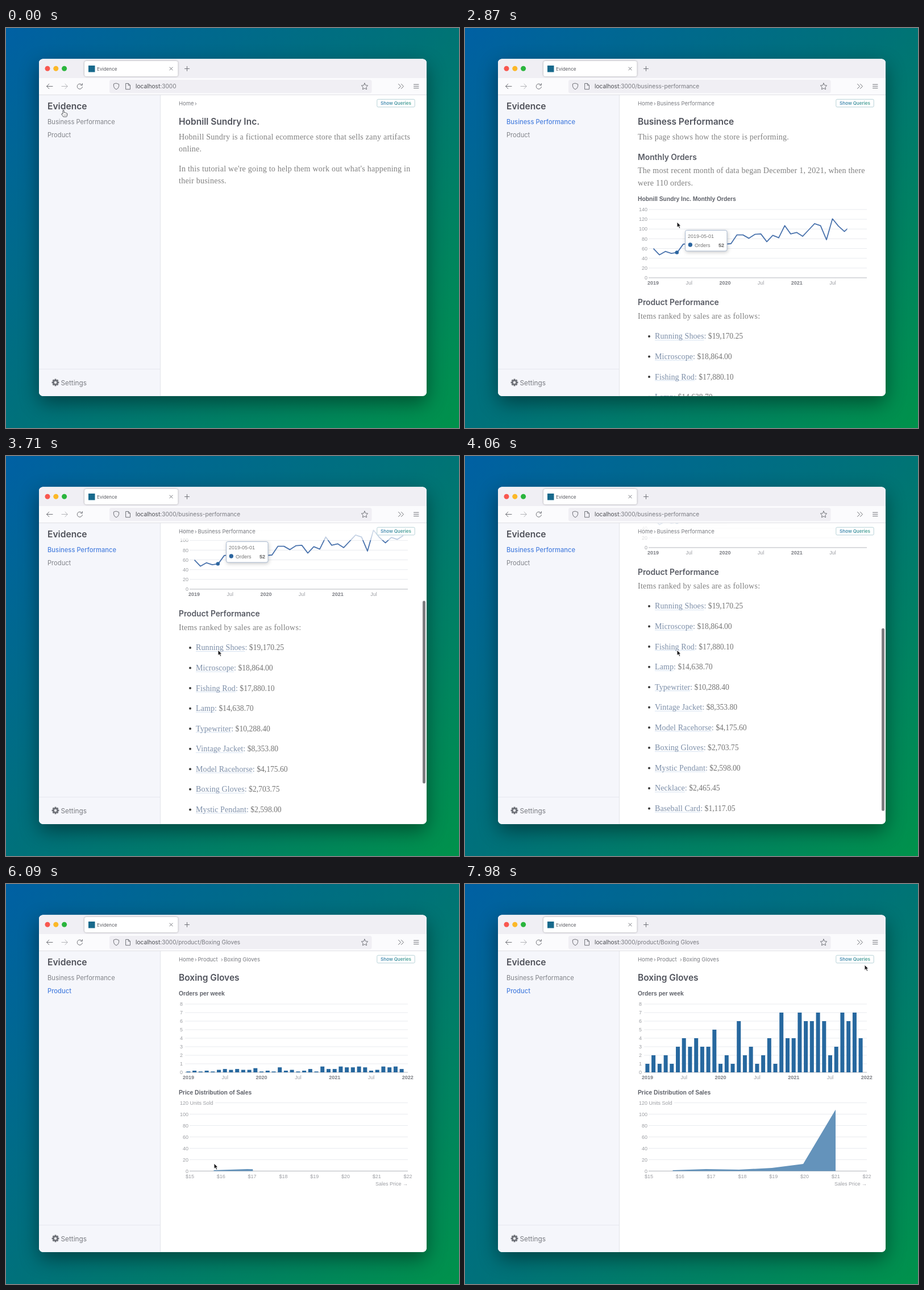
Recreate the animation shown at these times as an HTML page. Size 797 by 703 pixels, loop 8 s.

```html
<!DOCTYPE html>
<html lang="en">
<head>
<meta charset="utf-8">
<title>Evidence</title>
<style>
  html, body { margin: 0; width: 100%; height: 100%; overflow: hidden; }
  svg { display: block; width: 100%; height: 100%; }
  text { white-space: pre; }
  .ui { font-family: Inter, sans-serif; }
  .bold { font-family: Inter, sans-serif; font-weight: 600; }
  .serif { font-family: "Liberation Serif", serif; letter-spacing: .25px; }
  .link { letter-spacing: .1px; }
  .price { font-size: 13.6px; letter-spacing: 0; }
  .chart { font-family: "Liberation Sans", Arial, sans-serif; }
  .chartB { font-family: "Liberation Sans", Arial, sans-serif; font-weight: 700; }
  .nav { fill: #818389; }
  .nav.active { fill: #4a80df; font-weight: 500; letter-spacing: .05px; }
  .icon { fill: none; stroke: #707278; stroke-width: 1; stroke-linecap: round; stroke-linejoin: round; }
  .window { filter: drop-shadow(0 12px 17px rgba(0, 0, 0, .42)); }
</style>
</head>
<body>
<svg id="stage" viewBox="0 0 797 703" xmlns="http://www.w3.org/2000/svg"></svg>
<script>
const LOOP = 8000, STEP = 70;
const BIZ_AT = 1960, PRODUCT_AT = 5800, DRAW = 1000;
const STORE = "Hobnill Sundry";
const HOST = "localhost:3000";

const orders = [60, 47, 54, 50, 52, 69, 70, 64, 73, 66, 76, 72, 69, 70, 88, 88, 81, 89,
  90, 74, 87, 82, 107, 90, 93, 85, 98, 111, 107, 78, 121, 106, 95, 106, 102, 110];
const weekly = [..."121213434335121623124174476676237674"].map(Number);
const sales = [[365.5, 1.5], [424, 3.5], [482, 2.5], [540, 5.5], [595, 12.5], [652, 108]];
const items = [
  ["Running Shoes", "19,170.25"], ["Microscope", "18,864.00"], ["Fishing Rod", "17,880.10"],
  ["Lamp", "14,638.70"], ["Typewriter", "10,288.40"], ["Vintage Jacket", "8,353.80"],
  ["Model Racehorse", "4,175.60"], ["Boxing Gloves", "2,703.75"], ["Mystic Pendant", "2,598.00"],
  ["Necklace", "2,465.45"], ["Baseball Card", "1,117.05"], ["Toy Doll", "691.25"]];

// y is the visual middle of the line
const text = (x, y, size, cls, fill, str, extra = "") =>
  `<text x="${x}" y="${y + size * .35}" font-size="${size}" class="${cls}" fill="${fill}" ${extra}>${str}</text>`;
const rect = (x, y, w, h, fill, extra = "") =>
  `<rect x="${x}" y="${y}" width="${w}" height="${h}" fill="${fill}" ${extra}/>`;
const hline = (x1, x2, y, color) =>
  `<path d="M${x1} ${y}H${x2}" stroke="${color}" fill="none"/>`;
const icon = (d, extra = "") => `<path class="icon" d="${d}" ${extra}/>`;
const group = (id, body, extra = "") => `<g id="${id}" ${extra}>${body}</g>`;
const range = n => [...Array(n).keys()];

const title = str => text(304, 164.5, 15.5, "bold", "#50535c", str);
const heading = (y, str) => text(304, y, 13.8, "bold", "#585b64", str);
const para = (y, str) => text(304, y, 14, "serif", "#808080", str);
const chartTitle = (y, str) => text(304, y, 10.3, "chartB", "#5f626a", str);
const label = (x, y, str, anchor = "middle", bold = false) =>
  text(x, y, 9, bold ? "chartB" : "chart", bold ? "#7c7e84" : "#9c9ea3", str, `text-anchor="${anchor}"`);

function grid(left, base, step, max, unit, labelX) {
  let out = "";
  for (let v = 0; v <= max; v += step) {
    const y = base - v * unit;
    out += hline(left, 707, y, v ? "#e9ebef" : "#b4b7bd") + label(labelX, y, v, "end");
  }
  return out;
}

const yearLabels = (x0, gap, y, n) => range(n).map(i =>
  label(x0 + i * gap, y, i % 2 ? "Jul" : 2019 + i / 2, "middle", i % 2 === 0)).join("");

const crumbs = (...parts) => parts.map(([x, s]) => text(x, 133, 9.5, "ui", "#797b81", s)).join("");

function homePage() {
  return title(STORE + " Inc.") +
    para(191.5, STORE + " is a fictional ecommerce store that sells zany artifacts") +
    para(212.5, "online.") +
    para(247.5, "In this tutorial we're going to help them work out what's happening in") +
    para(268.5, "their business.");
}

function bizPage() {
  const base = 439, unit = 120 / 140;
  const pts = orders.map((v, i) => `${(331.5 + i * 10.5).toFixed(1)},${(base - v * unit).toFixed(1)}`);
  const list = items.map(([name, price], i) => {
    const y = 541.5 + i * 35.55;
    return `<circle cx="324" cy="${y + .5}" r="2" fill="#3c3c3c"/>` +
      `<path class="under" d="" stroke="#d6e2f1"/>` +
      text(334, y, 14, "serif", "#757575",
        `<tspan class="link" fill="#7d8fa9">${name}:</tspan><tspan class="price"> $${price}</tspan>`);
  }).join("");
  const tip = rect(387.5, 355.5, 73.5, 36.5, "#fff", 'rx="3" stroke="#a9b9cf" style="filter:drop-shadow(1px 2px 3px rgba(0,0,0,.2))"') +
    text(392, 365.5, 9, "chart", "#777", "2019-05-01") +
    '<circle cx="396.3" cy="381" r="3.7" fill="#2c659f"/>' +
    text(404, 381.5, 9, "chart", "#777", "Orders") +
    text(456, 381.5, 9, "chartB", "#666", "52", 'text-anchor="end"');
  return title("Business Performance") +
    para(191.5, "This page shows how the store is performing.") +
    heading(227, "Monthly Orders") +
    para(250.5, "The most recent month of data began December 1, 2021, when there") +
    para(272, "were 110 orders.") +
    chartTitle(300, STORE + " Inc. Monthly Orders") +
    grid(323, base, 20, 140, unit, 321) + yearLabels(331, 63.2, 447.5, 6) +
    `<polyline points="${pts.join(" ")}" fill="none" stroke="#4a73ad" stroke-width="1.8" stroke-linejoin="round" clip-path="url(#lineClip)"/>` +
    group("tip", `<circle cx="372.8" cy="394.4" r="3.2" fill="#2c659f"/>` + tip) +
    heading(482, "Product Performance") +
    para(506.5, "Items ranked by sales are as follows:") + list;
}

function productPage() {
  const area = sales.map(([x, v]) => `L${x} ${504.5 - v}`).join("");
  return title("Boxing Gloves") +
    chartTitle(192, "Orders per week") + grid(315, 331, 1, 8, 15, 311) +
    yearLabels(321, 64.3, 339.5, 7) +
    weekly.map((v, i) => rect((317.4 + i * 10.72).toFixed(1), 331, 7, 0, "#27689f", 'class="bar"')).join("") +
    chartTitle(366, "Price Distribution of Sales") + grid(323, 504.5, 20, 120, 1, 321) +
    rect(322, 380, 46, 9, "#fff") + label(323.5, 384.5, "Units Sold", "start") +
    range(8).map(i => label(323.5 + i * 54.8, 513.5, "$" + (15 + i))).join("") +
    label(707, 526.5, "Sales Price →", "end") +
    `<path d="M365.5 504.5${area}V504.5Z" fill="#6493bb" clip-path="url(#areaClip)"/>`;
}

function chrome() {
  const dots = ["#f9574f", "#fcb827", "#2ab53c"].map((c, i) =>
    `<circle cx="${73 + i * 14.8}" cy="71.3" r="4.5" fill="${c}"/>`).join("");
  return rect(58, 54, 682, 34, "#f0eff4") + rect(58, 88, 682, 30, "#fbfbfd") +
    hline(58, 740, 117.5, "#dfdfe4") + dots +
    rect(138, 58, 164.5, 27, "#fff", 'rx="3.5" style="filter:drop-shadow(0 0 1.5px rgba(0,0,0,.35))"') +
    rect(145, 66, 11.5, 11.5, "#17698c") + text(160, 72, 8.2, "ui", "#5a5b61", "Evidence") +
    icon("M288 69l5 5M293 69l-5 5") + icon("M314.5 71.5h8M318.5 67.5v8") +
    icon("M82 102.5H71.5M75.8 98.3l-4.3 4.2l4.3 4.2") +
    icon("M98 102.5H108M104 98.3l4.3 4.2l-4.3 4.2", 'style="stroke:#b3b4b9"') +
    icon("M133.6 100A4.6 4.6 0 1 0 134.4 103.5M134.4 97.5V100.5H131.4") +
    rect(182, 91, 461.5, 23.5, "#f0eff4", 'rx="3.5"') +
    icon("M194 97.2l4.6 1.5v3.5q-.4 4-4.6 5.8q-4.2-1.8-4.6-5.8v-3.5z") +
    icon("M211 97.5h4.5l3 3v7.2h-7.5zM215.3 97.7v3h3") +
    icon("M631 97l1.7 3.6 4 .5-2.9 2.8.7 4-3.5-1.9-3.5 1.9.7-4-2.9-2.8 4-.5z") +
    group("reader", icon("M606.5 97.8h8v9.6h-8zM608.5 100.5h4M608.5 102.6h4M608.5 104.7h2.5")) +
    icon("M690.5 98.5l4 4-4 4M695.5 98.5l4 4-4 4") +
    icon("M717.5 99.2h8.5M717.5 102.4h8.5M717.5 105.6h8.5") +
    `<text class="ui" x="228" y="106.4" font-size="10.15" fill="#797a80"><tspan fill="#4c4d53">localhost</tspan>:3000<tspan id="path"></tspan></text>`;
}

function sidebar() {
  const teeth = range(8).map(i => rect(85.6, 616.6, 2.8, 3, "#6f7279", `transform="rotate(${i * 45} 87 623)"`)).join("");
  return rect(58, 118, 213.5, 529, "#f5f6fb") +
    '<path d="M271.5 118V647" stroke="#e2e4ea"/>' + hline(58, 271, 599.5, "#e6e8ef") +
    text(73, 138, 15.6, "bold", "#4e5058", "Evidence") +
    text(73, 165.3, 11.15, "ui nav", "", "Business Performance", 'id="bizLink"') +
    text(73, 188, 11.15, "ui nav", "", "Product", 'id="prodLink"') +
    teeth + '<circle cx="87" cy="623" r="3.6" fill="none" stroke="#6f7279" stroke-width="2.8"/>' +
    text(96.5, 624, 11.8, "ui", "#797b81", "Settings");
}

const stage = document.getElementById("stage");
stage.innerHTML = `<defs>
  <linearGradient id="bg" gradientUnits="userSpaceOnUse" x1="20" y1="-20" x2="777" y2="723">
    <stop offset="0" stop-color="#0060a3"/><stop offset=".5" stop-color="#007278"/><stop offset="1" stop-color="#00924b"/>
  </linearGradient>
  <linearGradient id="fade" x2="0" y2="1">
    <stop offset="0" stop-color="#fff" stop-opacity=".85"/><stop offset=".65" stop-color="#fff" stop-opacity=".72"/>
    <stop offset="1" stop-color="#fff" stop-opacity=".6"/>
  </linearGradient>
  <linearGradient id="teal"><stop offset="0" stop-color="#4589b5"/><stop offset="1" stop-color="#4ba593"/></linearGradient>
  <clipPath id="frame"><rect x="58" y="54.5" width="682" height="592.3" rx="7"/></clipPath>
  <clipPath id="view"><rect x="272" y="118" width="468" height="529"/></clipPath>
  <clipPath id="lineClip"><rect id="lineRect" x="323" y="300" width="0" height="145"/></clipPath>
  <clipPath id="areaClip"><rect id="areaRect" x="323" y="380" width="0" height="130"/></clipPath>
</defs>` +
  rect(0, 0, 797, 703, "url(#bg)") +
  rect(58, 54.5, 682, 592.3, "#fff", 'rx="7" class="window"') +
  `<g clip-path="url(#frame)">` + rect(58, 54, 682, 593, "#fff") +
  `<g clip-path="url(#view)">` +
  group("home", homePage()) + group("biz", bizPage()) + group("product", productPage()) +
  rect(272, 118, 468, 30, "url(#fade)") +
  group("homeCrumb", crumbs([304, "Home"], [332, "›"])) +
  group("bizCrumb", crumbs([304, "Home"], [332, "›"], [337.5, "Business Performance"])) +
  group("productCrumb", crumbs([304, "Home"], [332, "›"], [337.5, "Product"], [378, "›"], [383, "Boxing Gloves"])) +
  rect(652.8, 125.3, 66.4, 13.6, "#fff", 'rx="2" stroke="#b7d2d8"') +
  text(686, 132.5, 8, "bold", "url(#teal)", "Show Queries", 'text-anchor="middle"') +
  rect(733, 119, 5, 321, "#7d7d80", 'rx="2.5" id="thumb"') + `</g>` +
  sidebar() + chrome() +
  group("status", rect(57, 633, 156, 16, "#f9f9fb", 'id="statusBox" rx="2" stroke="#cfcfd5"') +
    text(62, 640, 8.2, "ui", "#56575d", "", 'id="statusText"')) + `</g>` +
  group("arrow", `<path d="M0 0V9.6L2.3 7.5L4 11.2L5.8 10.4L4.2 6.9H7Z" fill="#1c1c1e" stroke="#fff" stroke-width=".9"/>`) +
  group("hand", `<path d="M-1 .9Q0-.6 1 .9V4.6Q2.4 3.8 3 5Q4.6 4.4 5 5.7Q6.6 5.4 6.8 7V9Q6.6 10.6 5.6 12H-.2Q-1.6 9.8-3.4 7.7Q-3.4 6-1.6 6.8L-1 7.3Z" fill="#fff" stroke="#55565c" stroke-width="1"/><path d="M1.2 8v2M3 8v2M4.8 8v2" stroke="#77787d" stroke-width=".7"/>`);

const $ = id => document.getElementById(id);
const bars = stage.querySelectorAll(".bar");
const unders = stage.querySelectorAll(".under");
stage.querySelectorAll(".link").forEach((link, i) => {
  const y = 548.5 + i * 35.55;
  unders[i].setAttribute("d", `M334 ${y}h${link.getComputedTextLength() - 4}`);
});

const clamp = v => Math.max(0, Math.min(1, v));
const cubicInOut = p => p < .5 ? 4 * p ** 3 : 1 - (2 - 2 * p) ** 3 / 2;
const smooth = p => p * p * (3 - 2 * p);
const linear = p => p;
const show = (id, on) => $(id).style.display = on ? "" : "none";
const set = (el, name, v) => el.setAttribute(name, v);

// keys: [time, ...values]
function track(keys, t, ease) {
  const n = keys.findIndex(k => k[0] > t);
  if (n === 0) return keys[0].slice(1);
  if (n < 0) return keys[keys.length - 1].slice(1);
  const a = keys[n - 1], b = keys[n], p = ease((t - a[0]) / (b[0] - a[0]));
  return a.slice(1).map((v, i) => v + (b[i + 1] - v) * p);
}

const pointerKeys = [[210, 101, 144], [1050, 122, 160], [1960, 122, 160], [2660, 373, 341],
  [4340, 373, 341], [4690, 374, 413], [5110, 366, 491], [6930, 366, 491], [7840, 703, 142]];
const scrollKeys = [[3080, 0], [3430, 86], [3710, 205], [4060, 278], [4340, 310]];

function draw(time) {
  const t = Math.floor(time / STEP) * STEP;
  const page = t < BIZ_AT ? "home" : t < PRODUCT_AT ? "biz" : "product";
  for (const p of ["home", "biz", "product"]) {
    show(p, p === page);
    show(p + "Crumb", p === page);
  }
  const path = { home: "", biz: "/business-performance", product: "/product/Boxing Gloves" };
  $("path").textContent = path[page];
  $("bizLink").classList.toggle("active", page === "biz" || (t >= 1680 && page === "home"));
  $("prodLink").classList.toggle("active", page === "product");

  const [scroll] = track(scrollKeys, t, linear);
  set($("biz"), "transform", `translate(0 ${-scroll})`);
  set($("thumb"), "y", 119 + scroll * .661);
  show("thumb", page === "biz" && t > 3080);
  show("tip", t >= 2660 && t < 4340);
  show("reader", t >= 4130 && t < PRODUCT_AT);

  set($("lineRect"), "width", 384 * clamp((t - BIZ_AT) / DRAW));
  const grow = clamp((t - PRODUCT_AT) / DRAW);
  set($("areaRect"), "width", 384 * grow);
  bars.forEach((bar, i) => {
    const h = weekly[i] * 15 * cubicInOut(grow);
    set(bar, "y", 331 - h);
    set(bar, "height", h);
  });

  const first = t >= 1260 && t < BIZ_AT, second = t >= 5180 && t < PRODUCT_AT;
  show("status", first || second);
  if (first || second) {
    $("statusText").textContent = HOST + (first ? path.biz : path.product);
    set($("statusBox"), "width", $("statusText").getComputedTextLength() + 8.5);
  }

  const [x, y] = track(pointerKeys, t, smooth);
  const hand = t < 2030 || (t >= 4620 && t < PRODUCT_AT);
  show("hand", hand);
  show("arrow", !hand);
  set($(hand ? "hand" : "arrow"), "transform", `translate(${x} ${y})`);
}

const start = performance.now();
function tick(now) {
  draw(Math.max(0, now - start) % LOOP);
  requestAnimationFrame(tick);
}
draw(0);
requestAnimationFrame(tick);
</script>
</body>
</html>
```
